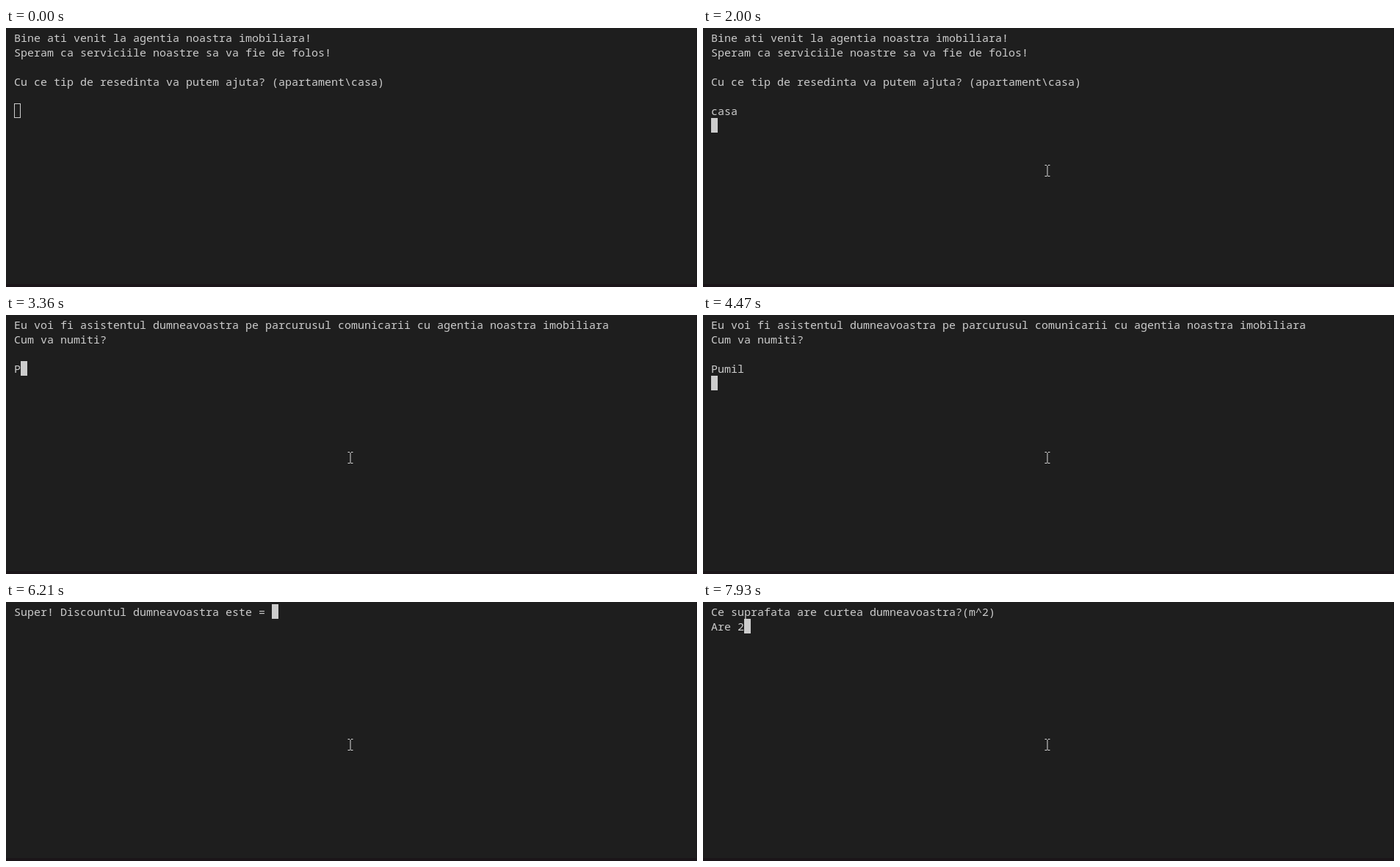
Write an HTML page that moves like this. It is 941 px wide and 354 px high and loops after 8000 ms.

```html
<!DOCTYPE html>
<html lang="ro">
<head>
<meta charset="utf-8">
<style>
  html, body { margin: 0; width: 100%; height: 100%; overflow: hidden; background: #1e1e1e; }
  #stage { position: relative; width: 941px; height: 354px; overflow: hidden;
    border-bottom: 4px solid #1b1519; border-right: 1px solid #19171a; box-sizing: border-box; }
  #text { position: absolute; left: 11px; top: 3px; margin: 0; color: #ccc;
    font: 15px/20px "Noto Sans Mono", "DejaVu Sans Mono", monospace; font-variant-ligatures: none; }
  #caret { position: absolute; width: 9px; height: 20px; box-sizing: border-box; border: 1px solid #ccc; }
  #mouse { position: absolute; left: -4px; top: -8px; }
</style>
</head>
<body>
<div id="stage">
  <pre id="text"></pre>
  <div id="caret"></div>
  <svg id="mouse" width="8" height="17" stroke="#ddd" fill="none">
    <path d="M.5 .5H3M5 .5H7.5M4 1V16M.5 15.5H3M5 15.5H7.5"/>
  </svg>
</div>
<script>
const [text, caret, mouse] = ['text', 'caret', 'mouse'].map(id => document.getElementById(id));
const LOOP = 8000, COL = 9, ROW = 20, LEFT = 11, TOP = 3;
const FOCUS = 840;

const welcome = 'Bine ati venit la agentia noastra imobiliara!\n' +
  'Speram ca serviciile noastre sa va fie de folos!\n\n' +
  'Cu ce tip de resedinta va putem ajuta? (apartament\\casa)\n\n';
const intro = 'Eu voi fi asistentul dumneavoastra pe parcurusul comunicarii cu agentia noastra imobiliara\n';
const askName = intro + 'Cum va numiti?\n\n';
const askHouse = 'Ma bucur sa va cunosc, Pumil! Ce suprafata utila are casa dumneavoastra?(m^2)\nAre ';
const askYard = 'Ce suprafata are curtea dumneavoastra?(m^2)\n';

// One screen per typed key, the last time being Enter.
const typed = (prompt, answer, times) =>
  times.map((t, i) => [t, prompt + (answer + '\n').slice(0, i + 1)]);

const screens = [
  [0, welcome],
  ...typed(welcome, 'casa', [1390, 1450, 1590, 1720, 2000]),
  [2060, intro],
  [2130, askName],
  ...typed(askName, 'Pumil', [3360, 3490, 3750, 4080, 4140, 4470]),
  [4540, askHouse],
  ...typed(askHouse, '200', [5810, 5940, 6010, 6140]),
  [6210, 'Super! Discountul dumneavoastra este = '],
  [6960, askYard],
  [7100, askYard + 'Are '],
  [7930, askYard + 'Are 2'],
];

function mouseAt(t) {
  if (t >= 1050) return [469, 195];
  if (t >= FOCUS) return [470, 196];
  const step = Math.min(6, Math.floor((t - 170) / 68));
  const rest = (1 - step / 6) ** 2;
  return [Math.round(471 + 169 * rest), Math.round(197 + 87 * rest)];
}

function draw(now) {
  const t = now % LOOP;
  const content = screens.findLast(s => s[0] <= t)[1];
  if (text.textContent !== content) text.textContent = content;

  const lines = content.split('\n');
  caret.style.left = LEFT + COL * lines.at(-1).length + 'px';
  caret.style.top = TOP + ROW * (lines.length - 1) + 'px';
  caret.style.background = t >= FOCUS ? '#ccc' : 'none';

  const [x, y] = mouseAt(t);
  mouse.style.visibility = t < 170 ? 'hidden' : 'visible';
  mouse.style.transform = `translate(${x}px, ${y}px)`;
  requestAnimationFrame(draw);
}

const start = performance.now();
requestAnimationFrame(now => draw(Math.max(0, now - start)));
</script>
</body>
</html>
```
